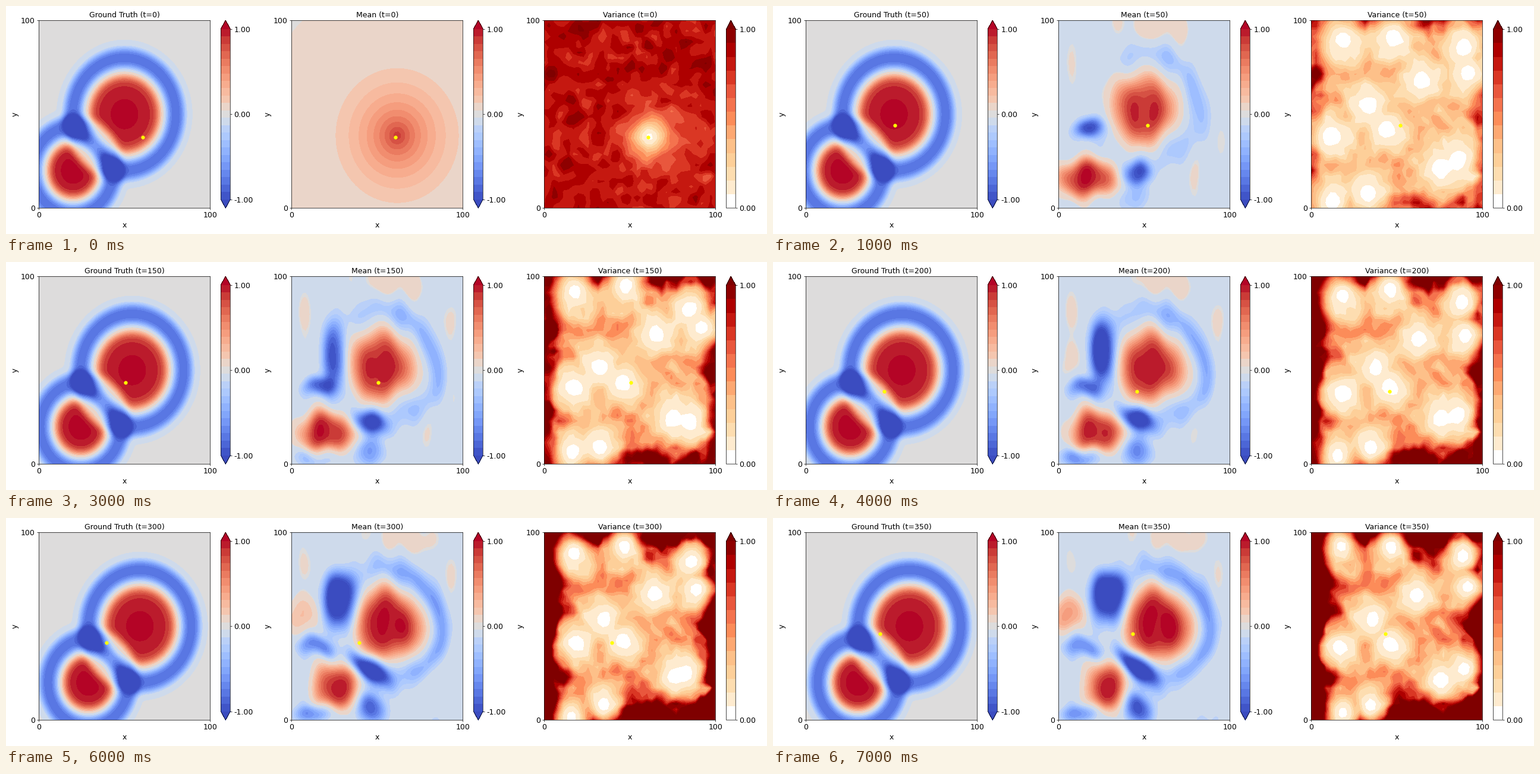
Write a matplotlib script that moves like this. It is 1280 px wide and 384 px high and loops after 8 s.

```python
import numpy as np
import matplotlib.pyplot as plt
from matplotlib.animation import FuncAnimation
from matplotlib.colors import ListedColormap

W, H, DPI = 1280, 384, 64
FRAMES, STEP = 8, 50

plt.rcParams.update({"font.family": "DejaVu Sans", "font.size": 14,
                     "axes.titlesize": 14, "axes.labelsize": 14})

# Contour levels: narrow bands except around zero
half = np.r_[0.01, np.linspace(0.2, 1, 11)]
SIGNED = np.r_[-half[::-1], half]
POSITIVE = np.r_[0, 0.05, np.linspace(0.16, 1, 12)]
shades = plt.get_cmap("OrRd")(np.linspace(0, 1, 256))
shades[:13] = 1
HEAT = ListedColormap(shades)


def grid(n):
    axis = np.linspace(0, 100, n)
    return np.meshgrid(axis, axis)


FINE, MID, COARSE = grid(151), grid(75), grid(36)


def ramp(t, start, end):
    """Smooth step from 0 to 1 between two times."""
    a = np.clip((t - start) / (end - start), 0, 1)
    return a * a * (3 - 2 * a)


# Ground truth: two drifting discs, each with a negative rim
def disc(r, edge, rim):
    core = (1.025 - 0.0004 * r ** 2) / (1 + np.exp((r - edge) / 1.4))
    return core - 0.82 * np.exp(-np.abs((r - rim) / 6) ** 3)


def truth(t):
    x, y = FINE
    drift = 0.03 * t
    return (disc(np.hypot(x - 50 - drift, y - 50), 20.2, 30)
            + disc(np.hypot(x - 20 - drift, y - 20), 14.2, 23.5))


# Mean: a wobbly estimate of the discs that sharpens with time
def waves(seed, t, n=10):
    """Smooth random field that changes slowly with time."""
    rng = np.random.default_rng(seed)
    kx, ky = rng.normal(0, 0.15, (2, n))
    phase = rng.uniform(0, 2 * np.pi, n)
    x, y = (c[..., None] for c in MID)
    return np.cos(kx * x + ky * y + phase + 0.005 * t).sum(-1) * np.sqrt(2 / n)


def mean(t):
    if t == 0:
        r = np.hypot(MID[0] - 61.7, MID[1] - 38.6)
        return 0.94 * np.exp(-r / 25) - 0.025

    s = (t - STEP) / 300
    x = MID[0] + 1.3 * waves(1, t)
    y = MID[1] + 1.3 * waves(2, t)

    def bump(cx, cy, rx, ry, tilt=0):
        c, k = np.cos(tilt), np.sin(tilt)
        u = ((x - cx) * c + (y - cy) * k) / rx
        v = ((y - cy) * c - (x - cx) * k) / ry
        return 0.5 ** (np.hypot(u, v) ** (2 + min(rx, ry) / 8))

    z = -0.1 + 0.05 * waves(3, t)
    z += 0.14 * bump(60, 97, 25, 7)

    # big and small disc
    cx = 51 + 6 * s
    z += (1.0 + 0.12 * s) * bump(cx, 52, 17, 18.5)
    z += 1.1 * bump(18 + 8 * s, 15 + 3 * s, 16 - 6 * s, 9.5 + 2 * s)

    # rim of the big disc, strongest on the right
    r, angle = np.hypot(x - cx, y - 52), np.arctan2(y - 52, x - cx)
    facing = (1 + np.cos(angle - 0.2)) / 2
    z -= (0.3 + 0.25 * s) * facing * np.exp(-((r - 30) / 6) ** 2)

    # troughs between the discs and along the left side
    z -= (0.9 - 0.3 * s) * bump(18 - 4 * s, 42 - 5 * s, 8, 5)
    z -= (0.8 + 0.35 * s) * bump(45 + s, 18 + 10 * s, 8 + 5 * s, 6, -0.75 * s)
    z -= 1.2 * ramp(t, 50, 200) * bump(24 + 5 * s, 54 + 12 * s,
                                       6 + 3 * s, 17 - 5 * s)
    z -= (0.2 + 0.6 * s) * bump(46, 5, 7, 7)
    z -= 0.6 * ramp(t, 100, 200) * bump(12, 3, 9, 5)
    z += 0.6 * s ** 2 * bump(6, 56, 9, 9)
    return z


# Variance: low around visited spots, growing along the unvisited border
SPOTS = np.array([(18, 91), (47, 93), (86, 86), (91, 71), (64, 68), (36, 55),
                  (45, 42), (17, 41), (86, 25), (76, 23), (34, 8), (18, 5)])


def speckle():
    z = np.random.default_rng(7).normal(size=COARSE[0].shape)
    for axis in (0, 1):
        z = (np.roll(z, 1, axis) + 3 * z + np.roll(z, -1, axis)) / 5
    return z / z.std()


NOISE = speckle()


def variance(t):
    x, y = COARSE
    if t == 0:
        r = np.hypot(x - 61.5, y - 38)
        dip = 0.6 * np.exp(-(r / 8) ** 2) + 0.4 * np.exp(-(r / 20) ** 2)
        return np.maximum(0.86 * (1 + 0.075 * NOISE) * (1 - dip), 0.001)

    s = (t - STEP) / 300
    spots = SPOTS + np.random.default_rng(t).normal(0, 1.8, SPOTS.shape)
    gap = np.min([np.hypot(x - a, y - b) for a, b in spots], axis=0)
    rim = np.minimum(np.minimum(x, 100 - x), np.minimum(y, 100 - y))
    z = (0.45 + 0.15 * s) * (1 - np.exp(-(gap / 15) ** 2))
    z += ((0.4 + 1.2 * s) * np.exp(-(rim / (7 + 4 * s)) ** 2)
          * (1 - np.exp(-(gap / 13) ** 3)))
    return np.maximum(z * (1 + 0.2 * NOISE), 0.001)


# Sensor position at a few times
TIMES = [0, 50, 100, 200, 250, 350]
PATH_X = [60.8, 52, 55.3, 45.8, 35.5, 43.3]
PATH_Y = [37.8, 44, 48, 38.8, 36.7, 46]

fig = plt.figure(figsize=(W / DPI, H / DPI), dpi=DPI, facecolor="white")
axes = fig.subplots(1, 3, gridspec_kw=dict(
    left=55.1 / W, right=1265.5 / W, wspace=64.6 / 360.4,
    bottom=43.8 / H, top=359.8 / H))


class Panel:
    def __init__(self, ax, name, field, mesh, signed):
        self.ax, self.name, self.field, self.mesh = ax, name, field, mesh
        self.style = dict(levels=SIGNED if signed else POSITIVE,
                          cmap="coolwarm" if signed else HEAT,
                          vmin=-1 if signed else 0, vmax=1,
                          extend="both" if signed else "max")
        ax.set(xlim=(0, 100), ylim=(0, 100), xticks=[0, 100],
               yticks=[0, 100], xlabel="x", ylabel="y")
        self.dot, = ax.plot([], [], "o", color="yellow", zorder=5)
        self.fill = None
        self.draw(0)
        fig.colorbar(self.fill, ax=ax, format="%.2f",
                     ticks=[-1, 0, 1] if signed else [0, 1])

    def draw(self, t):
        if self.fill is not None:
            self.fill.remove()
        self.fill = self.ax.contourf(*self.mesh, self.field(t), **self.style)
        self.dot.set_data([np.interp(t, TIMES, PATH_X)],
                          [np.interp(t, TIMES, PATH_Y)])
        self.ax.set_title(f"{self.name} (t={t})")


panels = [Panel(axes[0], "Ground Truth", truth, FINE, True),
          Panel(axes[1], "Mean", mean, MID, True),
          Panel(axes[2], "Variance", variance, COARSE, False)]


def update(i):
    for panel in panels:
        panel.draw(i * STEP)
    return []


anim = FuncAnimation(fig, update, frames=FRAMES, interval=1000,
                     repeat=True, repeat_delay=0, blit=False)
plt.show()
```
